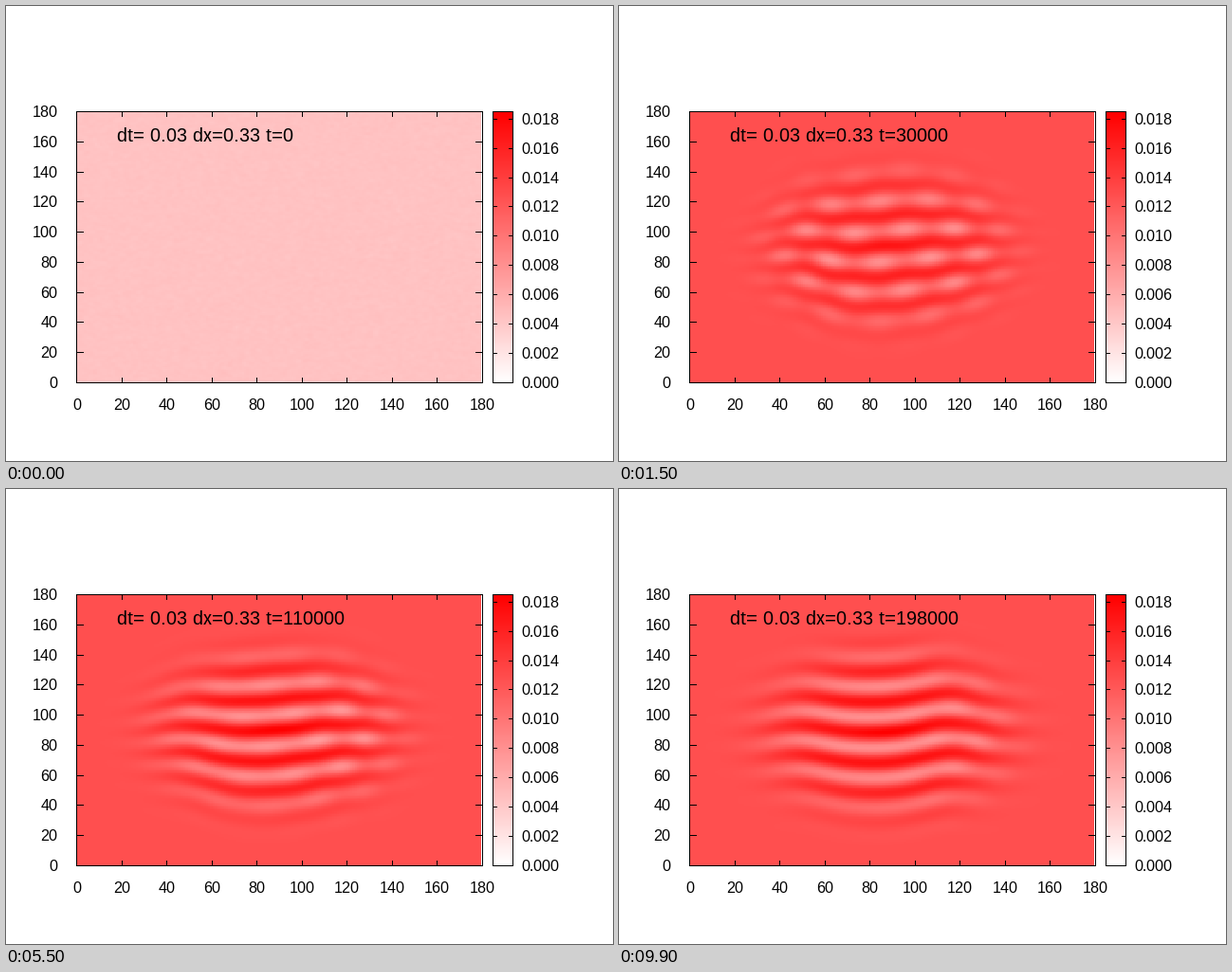
A matplotlib script for the animation above (10000 ms loop, 640 px wide and 480 px high).

```python
import numpy as np
import matplotlib.pyplot as plt
from matplotlib.animation import FuncAnimation
from matplotlib.colors import LinearSegmentedColormap

W, H, DPI = 640, 480, 100
FRAMES, STEP = 100, 100
LEFT, RIGHT, TOP, BOTTOM = 74, 502, 111, 397
N = 180
VMAX = 18.5              # colour scale, in thousandths
START, REST = 4.4, 12.7  # uniform levels before and after settling
ROW, SPOT = 20.4, 22.0   # stripe spacing, spot spacing along a stripe
FORMED, END = 2.7, 9.9   # seconds between which the pattern relaxes

plt.rcParams.update({
    "font.family": "Liberation Sans",
    "text.hinting": "default",
    "text.hinting_factor": 1,   # whole-pixel glyph advances
})
REDS = LinearSegmentedColormap.from_list("reds", ["white", "red"], N=512)

X, Y = np.meshgrid(np.arange(N - 1) + 0.5, np.arange(N) + 0.5)
U = X - 88
R = np.hypot(U, Y - 89)
rng = np.random.default_rng(4)


def bell(d, width):
    return np.exp(-(d / width) ** 2)


def mix(a, b, s):
    return a + (b - a) * s


def make_grain():
    g = rng.normal(0, 0.2, X.shape)
    for axis in (0, 1):
        g = (np.roll(g, 1, axis) + 2 * g + np.roll(g, -1, axis)) / 4
    return g


def make_ripples():
    total = np.zeros_like(X)
    for _ in range(14):
        angle, phase = rng.uniform(0, 2 * np.pi, 2)
        d = X * np.cos(angle) + Y * np.sin(angle)
        total += np.cos(2 * np.pi * d / ROW + phase)
    return 0.2 * total * bell(R, 45)


GRAIN, RIPPLES = make_grain(), make_ripples()


def pattern(t):
    """Hexagonal spots that merge into wavy stripes, left side first."""
    age = max(t - FORMED, 0)
    s = age / (END - FORMED)

    crest = (mix(91, 88.3, s)
             + mix(3.2, 0, s) * np.tanh(U / 24)
             + 5 * bell(X - 48, 17)
             + 6.5 * s * bell(X - 115, 18))
    bend = 1 + mix(0.35, 0.06, s) * (U / 50) ** 2
    theta = 2 * np.pi * (Y - crest) * bend / ROW

    life = 1.5 + 4 / (1 + np.exp((105 - X) / 8))
    broken = (0.35 + 0.45 * np.clip(U / 40, -1, 1) ** 2) * np.exp(-age / life)
    spots = np.sin(theta / 2) * np.cos(2 * np.pi * (X - 95) / SPOT)

    envelope = np.exp(-(R / mix(50, 53, s)) ** 4)
    peak = 1.2 * bell(U, 14) * bell(Y - crest, 6)
    return 4.6 * envelope * (np.cos(theta) - broken * spots) + peak


def field(i):
    if i == 0:
        return START + GRAIN
    t = i * STEP / 1000
    grow = 1 / (1 + np.exp((1.2 - t) / 0.3))
    return REST + grow * pattern(t) + bell(t - 0.3, 0.7) * RIPPLES


fig = plt.figure(figsize=(W / DPI, H / DPI), dpi=DPI, facecolor="white")
ax = fig.add_axes([0, 0, 1, 1])
ax.axis("off")


def line(x0, y0, x1, y1):
    ax.plot([x0 + 0.5, x1 + 0.5], [y0 + 0.5, y1 + 0.5], color="black",
            lw=72 / DPI, solid_capstyle="projecting", snap=False, zorder=3)


def box(x0, y0, x1, y1):
    for x in (x0, x1):
        line(x, y0, x, y1)
    for y in (y0, y1):
        line(x0, y, x1, y)


def label(x, y, s, ha, size=16):
    return ax.text(x, y, s, ha=ha, va="baseline", fontsize=size * 72 / DPI,
                   color="black", zorder=4)


style = dict(cmap=REDS, vmin=0, vmax=VMAX, aspect="auto", origin="lower",
             interpolation="nearest")
heat = ax.imshow(field(0), extent=(LEFT + 1, RIGHT - 1, BOTTOM, TOP + 1), **style)
ramp = np.linspace(0, VMAX, BOTTOM - TOP)[:, None]
ax.imshow(ramp, extent=(513, 535, BOTTOM, TOP), **style)

box(LEFT, TOP, RIGHT, BOTTOM)
box(513, TOP, 534, BOTTOM)

for v in range(0, N + 1, 20):
    px = round(LEFT + v / N * (RIGHT - LEFT))
    py = round(BOTTOM - v / N * (BOTTOM - TOP))
    line(px, BOTTOM, px, BOTTOM - 5)
    line(px, TOP, px, TOP + 5)
    line(LEFT, py, LEFT + 7, py)
    line(RIGHT, py, RIGHT - 7, py)
    label(px + 0.5, 426, str(v), "center")
    label(54.5, py + 6, str(v), "right")

for k in range(0, 19, 2):
    py = round(BOTTOM - k / VMAX * (BOTTOM - TOP))
    line(513, py, 517, py)
    line(534, py, 530, py)
    label(543.5, py + 6, f"{k / 1000:.3f}", "left")

title = label(117, 143, "", "left", 20)
ax.set_xlim(0, W)
ax.set_ylim(H, 0)


def update(i):
    heat.set_data(field(i))
    title.set_text(f"dt= 0.03 dx=0.33 t={2000 * i}")
    return heat, title


anim = FuncAnimation(fig, update, frames=FRAMES, interval=STEP,
                     repeat=True, repeat_delay=0)
plt.show()
```
